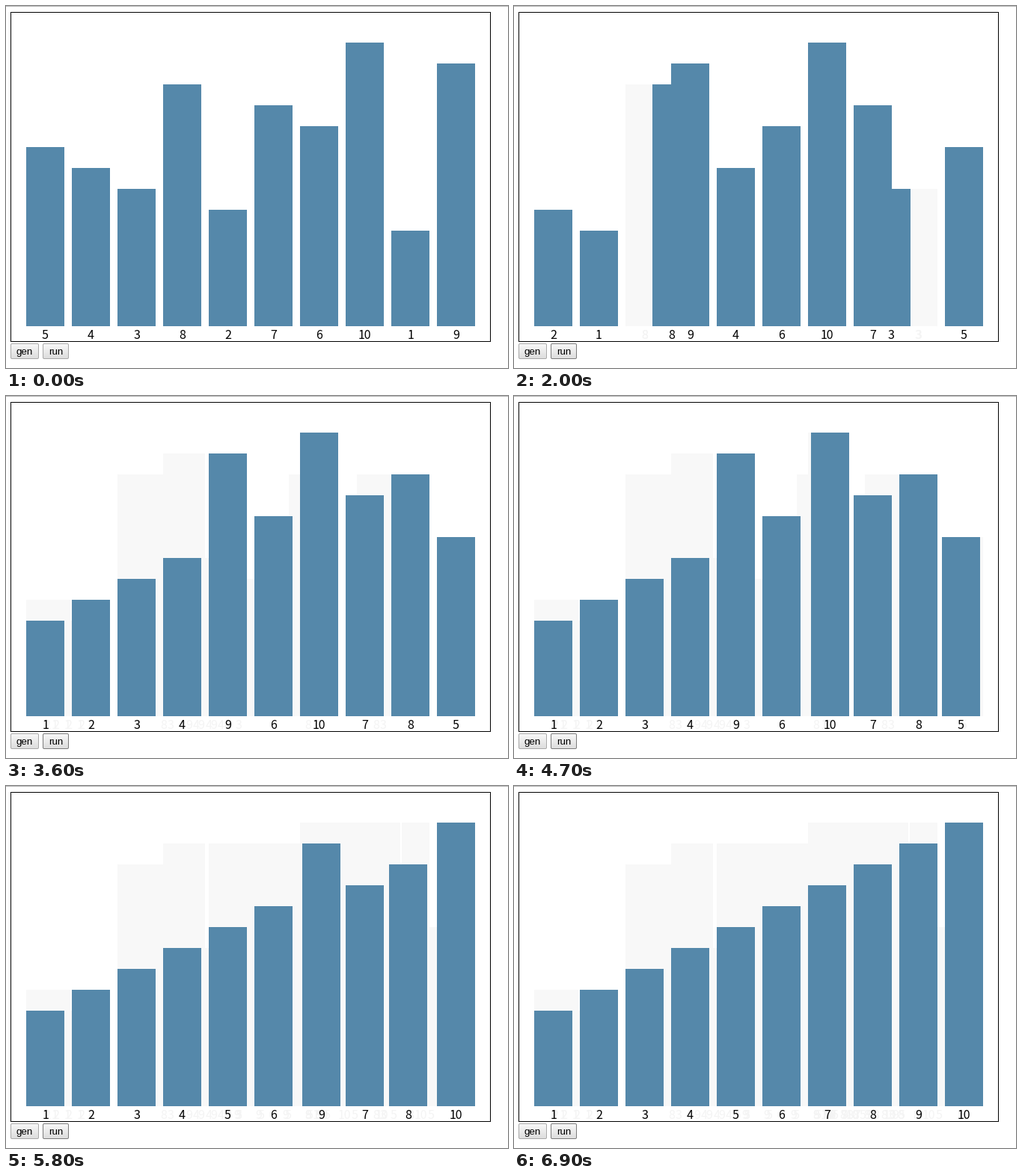
A matplotlib script for the animation above (7.9 s loop, 671 by 485 pixels).

```python
import math

import matplotlib.pyplot as plt
import numpy as np
from matplotlib.animation import FuncAnimation
from matplotlib.patches import FancyBboxPatch, Rectangle

W, H, DPI = 671, 485, 64
STEP, FRAMES = 100, 79
PX = 72 / DPI

FIRST = [5, 4, 3, 8, 2, 7, 6, 10, 1, 9]
SHUFFLED = [2, 1, 8, 9, 4, 6, 10, 7, 3, 5]
SHUFFLE_AT, SWAP_TIME = 800, 530
# start time, left slot, right slot
SWAPS = [(1892, 2, 8), (2466, 3, 4), (3030, 0, 1), (4650, 6, 9),
         (5190, 4, 6), (5747, 6, 8), (6290, 6, 7)]

LEFT, PITCH, BAR_W, BASE = 27, 61, 51, 429
BLUE, TRAIL, TRAIL_TEXT = "#5588aa", "#f8f8f8", "#f4f4f4"


def slot_x(slot):
    return LEFT + PITCH * slot


def bar_top(value):
    return 329 - 28 * value


def pose(t):
    """Left edge of every bar at time t, keyed by value."""
    order = list(FIRST if t < SHUFFLE_AT else SHUFFLED)
    shift = {}
    for start, i, j in SWAPS:
        if t <= start:
            break
        u = min((t - start) / SWAP_TIME, 1)
        if u < 1:
            move = PITCH * (j - i) * (1 - math.cos(math.pi * u)) / 2
            shift = {order[i]: move, order[j]: -move}
            break
        order[i], order[j] = order[j], order[i]
    return {v: slot_x(s) + shift.get(v, 0) for s, v in enumerate(order)}


fig = plt.figure(figsize=(W / DPI, H / DPI), dpi=DPI, facecolor="white")
ax = fig.add_axes([0, 0, 1, 1])
ax.axis("off")


def rect(x, y, w, h, color, z):
    return ax.add_patch(Rectangle((x, y), w, h, facecolor=color, linewidth=0, zorder=z))


def write(x, y, text, px, font, color="black", z=5):
    return ax.text(x, y, text, fontsize=px * PX, family=font, color=color,
                   ha="center", va="baseline", zorder=z)


def label(x, value, color="black", z=5):
    return write(x + BAR_W / 2, 446, str(value), 16, "Noto Sans CJK JP", color, z)


class Button:
    SHADE = np.linspace(0.965, 0.867, 19).reshape(-1, 1)

    def __init__(self, x, width, text):
        self.face = ax.imshow(self.SHADE, cmap="gray", vmin=0, vmax=1, aspect="auto",
                              extent=(x + 1, x + width - 1, 472, 453), zorder=2)
        self.edge = ax.add_patch(FancyBboxPatch(
            (x + 0.5, 452.5), width - 1, 20, boxstyle="round,pad=0,rounding_size=1.5",
            facecolor="none", edgecolor="#a9a9a9", linewidth=PX, zorder=3))
        write(x + width / 2, 467, text, 13.33, "Liberation Sans")

    def show(self, hover, pressed):
        self.edge.set_edgecolor("#7c7c7c" if hover else "#a9a9a9")
        self.face.set_data(self.SHADE[::-1] if pressed else self.SHADE)


gen = Button(6, 38, "gen")
run = Button(49, 35, "run")

rect(0, 0, W, 1, "#b8b8b8", 1)
for x, y, w, h in [(6, 8, 642, 1), (6, 449, 642, 1), (6, 8, 1, 442), (647, 8, 1, 442)]:
    rect(x, y, w, h, "black", 4)

bars = {v: rect(0, bar_top(v), BAR_W, BASE - bar_top(v), BLUE, 3) for v in FIRST}
labels = {v: label(0, v) for v in FIRST}


def build_trails():
    """Faint strips and digits left where a moving bar has just been."""
    trails = []
    for k in range(SHUFFLE_AT // STEP + 1, FRAMES):
        before, after = pose((k - 1) * STEP), pose(k * STEP)
        for v in FIRST:
            a, b = before[v], after[v]
            if a == b or (b - LEFT) % PITCH == 0:
                continue
            width = min(abs(b - a), BAR_W)
            x = a if b > a else a + BAR_W - width
            strip = rect(x, bar_top(v), width, BASE - bar_top(v), TRAIL, 1)
            trails.append((k, strip))
            trails.append((k, label(a, v, TRAIL_TEXT, 2)))
    return trails


trails = build_trails()
ax.set_xlim(0, W)
ax.set_ylim(H, 0)


def draw(k):
    t = k * STEP
    for v, x in pose(t).items():
        bars[v].set_x(x)
        labels[v].set_x(x + BAR_W / 2)
    for born, artist in trails:
        artist.set_visible(k >= born)
    gen.show(500 <= t < 900, t == 700)
    run.show(t >= 1700, t == 1800)
    return []


anim = FuncAnimation(fig, draw, frames=FRAMES, interval=STEP, repeat=True,
                     repeat_delay=0, blit=False)
plt.show()
```
